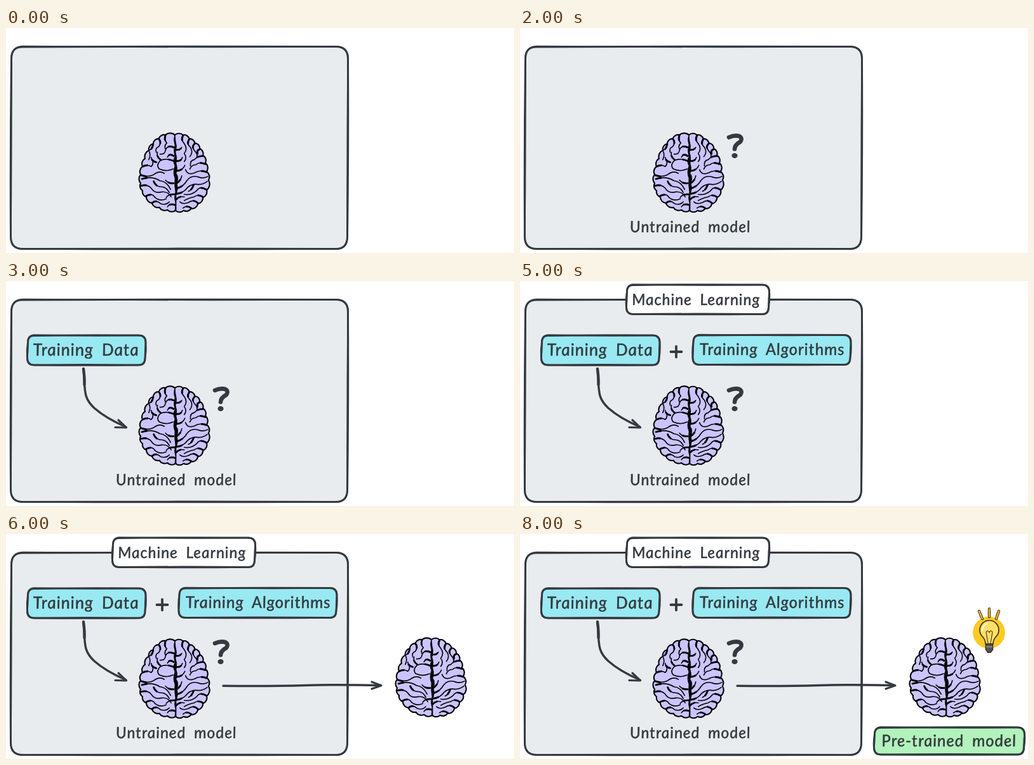
An HTML page that plays this animation: 800 by 356 pixels, repeating every 9000 ms.

```html
<!DOCTYPE html>
<html lang="en">
<head>
<meta charset="utf-8">
<title>Training a model</title>
<style>
  html, body { margin: 0; width: 100%; height: 100%; overflow: hidden; background: #fff; }
  svg { display: block; width: 100%; height: 100%; }
  text {
    font-family: Lato, "Open Sans", sans-serif; font-style: italic;
    letter-spacing: 1px; word-spacing: 6px; text-anchor: middle;
    fill: #343a40; stroke: #343a40; stroke-width: .5;
  }
  .ink { fill: none; stroke: #343a40; stroke-linecap: round; stroke-linejoin: round; }
  .folds { fill: none; stroke: #050508; stroke-linecap: round; stroke-linejoin: round; }
</style>
</head>
<body>
<svg id="stage" viewBox="0 0 800 356"></svg>
<script>
const LOOP = 9000;
const stage = document.getElementById('stage');

const ink = (d, width = 3.4) => `<path class="ink" stroke-width="${width}" d="${d}"/>`;

// The skew sets the italic letterforms almost upright, like handwriting.
const label = (words, x, y, size = 24.5) =>
  `<text transform="translate(${x} ${y}) skewX(6)" font-size="${size}">${words}</text>`;

// Rounded box with slightly bowed sides, inked twice like a pen sketch.
function box(x, y, w, h, r, fill) {
  const outline = bow => {
    const R = x + w, B = y + h, cx = x + w / 2, cy = y + h / 2;
    return `M${x + r} ${y + bow / 2}Q${cx} ${y - bow} ${R - r} ${y}Q${R} ${y} ${R} ${y + r}` +
      `Q${R + bow} ${cy} ${R - 1} ${B - r}Q${R - 1} ${B} ${R - r} ${B}` +
      `Q${cx} ${B - bow} ${x + r} ${B}Q${x} ${B} ${x} ${B - r}` +
      `Q${x - bow} ${cy} ${x + 1} ${y + r}Q${x + 1} ${y} ${x + r} ${y + bow / 2}Z`;
  };
  return `<path fill="${fill}" d="${outline(0)}"/>` + ink(outline(.8), 3) + ink(outline(-1.2), 2.4);
}

// Joins the points of a contour with outward bulges.
function lobes(points) {
  return points.map(([x, y], i) => {
    if (!i) return `M${x} ${y}`;
    const [px, py] = points[i - 1];
    const r = Math.hypot(x - px, y - py) * .74;
    return `A${r} ${r} 0 0 1 ${x} ${y}`;
  }).join('') + 'Z';
}

const contour = [
  [266, 168], [279, 168], [289, 174], [298, 181], [306, 190], [311, 201], [315, 213],
  [317, 227], [320, 241], [317, 257], [311, 269], [303, 279], [292, 287], [280, 290],
  [267, 290], [254, 289], [241, 285], [229, 278], [220, 268], [214, 258], [211, 246],
  [211, 232], [214, 219], [218, 206], [224, 193], [231, 182], [240, 174], [251, 168], [266, 168]
];

const folds = [
  // upper left
  'M251 168Q248 176 253 181Q248 186 251 191M240 174Q245 180 240 187Q234 189 236 196' +
  'M231 183Q230 191 224 193Q228 200 224 208M264 188Q254 184 251 192Q250 200 242 199' +
  'M264 202Q257 197 254 204M243 208Q236 203 238 196M214 219Q222 215 228 219Q233 214 229 207' +
  'M264 210Q252 205 243 209Q235 217 241 223Q252 228 263 223M236 212Q228 210 228 204',
  // lower left
  'M212 233Q222 237 232 232Q241 225 249 230M213 239Q230 234 242 242Q253 243 259 256' +
  'M264 246Q256 247 251 241M212 250Q221 247 228 254Q233 263 245 260Q255 259 260 268' +
  'M232 243Q235 252 246 252Q253 253 257 261M219 267Q229 261 234 269Q242 276 252 271' +
  'M229 278Q236 272 243 279Q252 282 257 276M266 264Q256 263 252 269M266 281Q258 278 254 284',
  // upper right
  'M279 169Q275 176 281 182Q287 190 281 198Q286 205 281 211M289 175Q284 182 291 188Q296 196 290 203' +
  'M298 182Q292 187 298 194Q303 199 301 205M306 191Q300 193 303 199M268 192Q274 193 277 188' +
  'M268 210Q276 211 278 204M311 202Q302 202 297 208Q290 209 291 218M315 215Q305 211 300 216Q293 216 290 223' +
  'M269 226Q279 225 282 217M317 228Q305 224 298 229Q287 234 283 224',
  // lower right
  'M270 254Q280 251 285 242Q292 232 304 236Q312 239 319 235M269 246Q276 241 277 234' +
  'M269 263Q281 261 286 253Q294 246 304 248Q312 248 318 243M316 256Q306 250 301 258Q292 266 281 264' +
  'M311 268Q303 263 297 268Q287 270 281 274M303 278Q296 271 288 277Q279 281 274 276' +
  'M268 272Q274 266 281 268M292 286Q285 281 279 286M296 249Q293 257 288 259'
];
const fissure = 'M266 167Q263 176 266 184Q263 193 266 203Q262 210 266 218Q262 228 266 238Q265 250 267 260Q264 270 267 278L266 291' +
  'L268 291L268 264Q272 254 269 246Q273 236 268 230Q271 221 268 214Q270 204 267 196Q270 186 267 178Z';

// Each fold starts thick and thins out.
const fold = d => `<path class="folds" stroke-width="1.7" d="${d}"/>` +
  `<path class="folds" stroke-width="3" stroke-dasharray="8 400" d="${d}"/>`;

const brain = (dx = 0, dy = 0) => `<g transform="translate(${266 + dx} ${228.5 + dy}) scale(.98) translate(-266 -228.5)">
  <path d="${lobes(contour)}" fill="#cac5fe" stroke="#050508" stroke-width="2.2" stroke-linejoin="round"/>
  ${folds.map(fold).join('')}
  <path d="${fissure}" fill="#050508" stroke="#050508" stroke-width=".8"/>
</g>`;

const question =
  ink('M329 173Q338 169 345 171Q351 174 347 180Q338 185 338 191.5', 6.6) +
  '<ellipse cx="338" cy="202" rx="4.6" ry="4" fill="#343a40"/>';

const dataArrow =
  ink('M122 139C125 174 121 184 139 201Q157 217 189 231') +
  ink('M122 139Q124 154 123.5 164', 4.4) +
  ink('M177 220L189.5 232L172 231.5', 3.2);

const modelArrow =
  ink('M342 240.3Q420 241 470 239.5T590 239.5') +
  ink('M576 234L591 239.7L576 245', 3.2);

const rays = 'M723 122L728 134M739 118.5L739 131M754 122L750 134';
const bulb = `
  <circle cx="738.5" cy="156" r="25.3" fill="#fcca22"/>
  <g stroke="#3a2c18" stroke-linecap="round" stroke-linejoin="round" fill="none">
    <path d="${rays}" stroke-width="4.4"/>
    <path d="${rays}" stroke="#f3b52b" stroke-width="2.4"/>
    <path d="M733 174Q733 167 728 162A15 15 0 1 1 750 162Q745 167 745 174Z" fill="#ffdf66" stroke-width="1.6"/>
    <path d="M728 153Q729 144 736 141.5" stroke="#fff6d0" stroke-width="2.6"/>
    <path d="M737 173L734 155Q737 151 739 156Q741 151 744 155L741 173" stroke-width="1.1"/>
    <path d="M733.5 174H744.5V183L741 187.5H737L733.5 183Z" fill="#575459" stroke-width="1.5"/>
    <path d="M734.5 178.5H743.5" stroke="#b7b3b2" stroke-width="1.2"/>
  </g>`;

const scenes = [
  [0, box(7.5, 29.5, 531, 320, 19, '#e8ecef') + brain()],
  [1000, question],
  [2000, label('Untrained model', 269, 323)],
  [3000, box(33.5, 86, 186.5, 47, 11, '#99e9f2') + label('Training Data', 127, 117.5, 26.5) + dataArrow],
  [4000, ink('M237.5 112H254.5M246 103.5V120.5', 3.8) +
    box(272, 85.5, 249, 47, 11, '#99e9f2') + label('Training Algorithms', 398, 116.5, 25.5)],
  [5000, box(167.5, 6, 225, 46.5, 11, '#fff') + label('Machine Learning', 278, 37.5)],
  [6000, modelArrow + brain(404, -2)],
  [7000, bulb],
  [8000, box(557.5, 306, 237, 43, 11, '#b2f2bb') + label('Pre-trained model', 676.5, 335.5, 25.5)]
];

stage.innerHTML = scenes.map(([, art]) => `<g>${art}</g>`).join('');
const layers = [...stage.children];

function render(time) {
  layers.forEach((layer, i) => {
    layer.style.display = time >= scenes[i][0] ? '' : 'none';
  });
}

const start = performance.now();
function tick() {
  render((performance.now() - start) % LOOP);
  requestAnimationFrame(tick);
}
tick();
</script>
</body>
</html>
```
